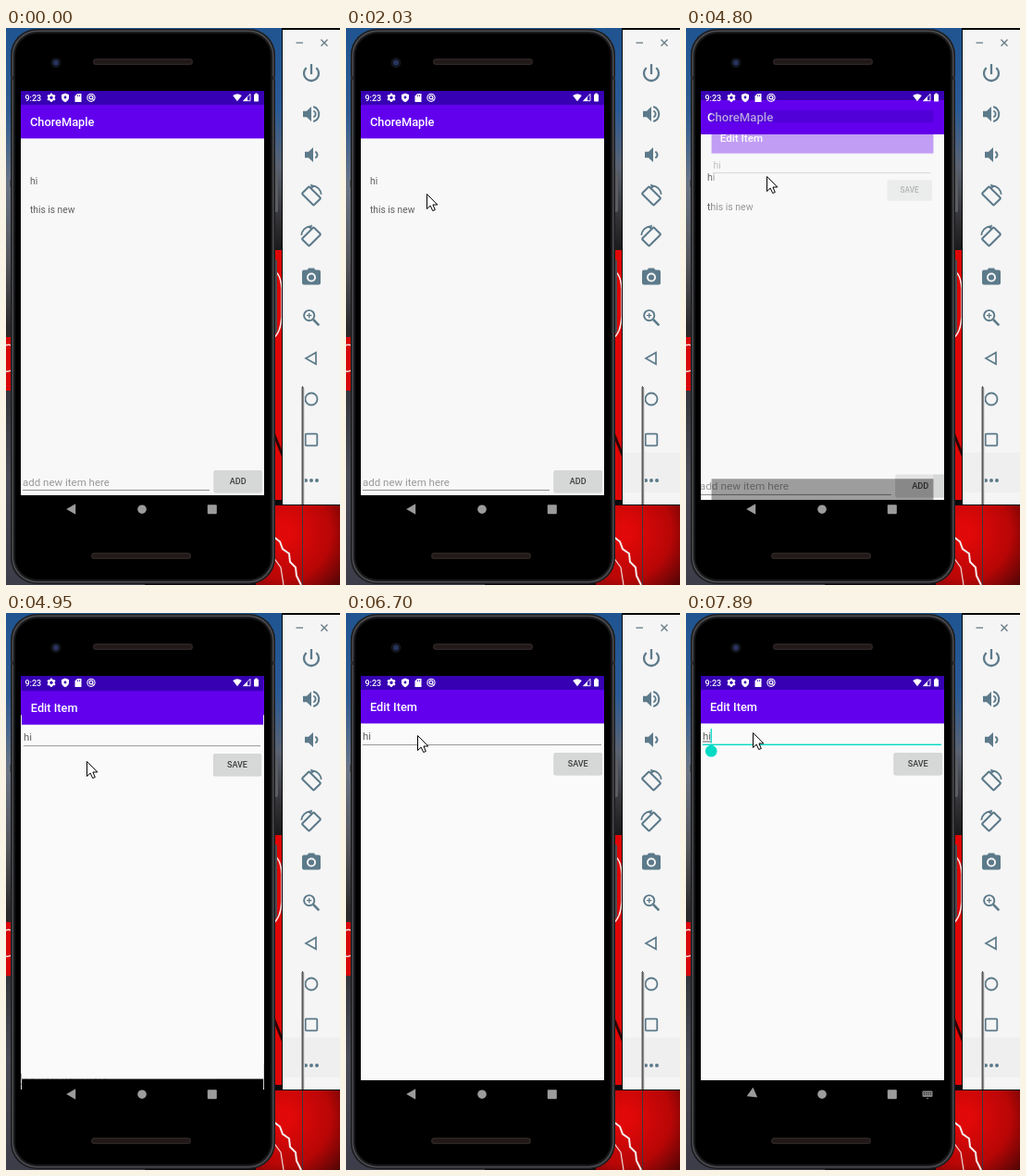
Write an HTML page with a canvas that moves like this. It is 361 px wide and 602 px high and loops after 8 s.

```html
<!DOCTYPE html>
<html lang="en">
<head>
<meta charset="utf-8">
<title>ChoreMaple</title>
<style>
  html, body { margin: 0; width: 100%; height: 100%; overflow: hidden; background: #000; }
  canvas { display: block; width: 361px; height: 602px; }
</style>
</head>
<body>
<canvas id="stage" width="361" height="602"></canvas>
<script>
const W = 361, H = 602, LOOP = 8000;
const stage = document.getElementById('stage').getContext('2d');
const layer = document.createElement('canvas');
layer.width = W;
layer.height = H;
const layerCtx = layer.getContext('2d');
let c = stage;

const PURPLE = '#6200ee', DEEP = '#3700b3', TEAL = '#03dac5', ICON = '#5c7a8a';

// pointer: [time, x, y]; no position means hidden
const POINTER = [
  [0], [500, 349, 483], [650, 22, 459], [1180], [1580, 100, 69], [1730, 102, 111],
  [1880, 92, 179], [2030, 87, 179], [3840, 87, 160], [5880, 87, 156], [6030, 84, 143],
  [6180, 83, 138], [6430, 81, 136], [6550, 79, 134], [6700, 77, 132],
  [7340, 76, 131], [7490, 73, 130], [7640, 72, 129]
];

function rect(x, y, w, h, fill) {
  c.fillStyle = fill;
  c.fillRect(x, y, w, h);
}

function round(x, y, w, h, r, fill) {
  c.fillStyle = fill;
  c.beginPath();
  c.roundRect(x, y, w, h, r);
  c.fill();
}

function disc(x, y, r, fill) {
  c.fillStyle = fill;
  c.beginPath();
  c.arc(x, y, r, 0, 7);
  c.fill();
}

function shape(d, fill) {
  c.fillStyle = fill;
  c.fill(new Path2D(d));
}

function line(d, color, width) {
  c.strokeStyle = color;
  c.lineWidth = width;
  c.stroke(new Path2D(d));
}

function arc(x, y, r, from, to, color, width) {
  c.strokeStyle = color;
  c.lineWidth = width;
  c.beginPath();
  c.arc(x, y, r, from, to);
  c.stroke();
}

function text(s, x, y, size, color, weight = 400, align = 'left') {
  c.font = `${weight} ${size}px Roboto, sans-serif`;
  c.textAlign = align;
  c.fillStyle = color;
  c.fillText(s, x, y);
}

function at(x, y, draw, turn = 0, sx = 1) {
  c.save();
  c.translate(x, y);
  c.rotate(turn);
  c.scale(sx, 1);
  draw();
  c.restore();
}

function fade(x, y, w, h, stops) {
  const g = c.createLinearGradient(0, y, 0, y + h);
  stops.forEach(([p, color]) => g.addColorStop(p, color));
  rect(x, y, w, h, g);
}

function wallpaper() {
  rect(0, 0, W, H, '#0b0b0f');
  fade(0, 0, 150, H, [[0, '#1f5490'], [.15, '#2f5c92'], [.28, '#6a7486'], [.42, '#55565c'],
    [.54, '#2a2829'], [.66, '#35353c'], [.8, '#4a4b58'], [1, '#3c3d49']]);
  rect(0, 334, 10, 58, '#d80808');
  line('M0 343Q4 341 8 345M0 371Q4 372 8 368', '#f3e6e6', 1.5);
  fade(150, 0, 149, 250, [[0, '#1f5490'], [.35, '#2a5a96'], [.6, '#5a6270'], [.85, '#2e2d30'], [1, '#141214']]);
  shape('M284 240H299V510H284Z', '#e00606');
  line('M288 262Q297 264 298 282V312Q297 330 288 336', '#f5eeee', 1.5);
  line('M286 430L299 462', '#2a0606', 3);

  const red = c.createRadialGradient(300, 545, 10, 300, 545, 85);
  red.addColorStop(0, '#e00808');
  red.addColorStop(.55, '#b80606');
  red.addColorStop(1, '#4a0505');
  rect(270, 516, 91, 86, red);
  line('M288 549L296 555L299 563L306 568L307 577L313 583L314 592L319 602', '#f4f0f0', 2);
  line('M289 572L297 583L300 602', '#f0dede', 1.2);
}

function phone() {
  round(288, 157, 6, 42, 2, '#5b5d62');
  round(288, 250, 5, 80, 2, '#4a4c51');
  rect(4, 164, 3, 8, '#4e5056');
  round(5, 1, 286, 600, 28, '#1d1d1f');
  round(6.5, 2.5, 283, 597, 27, '#4b4c50');
  round(8, 4, 280, 594, 26, '#19191b');
  round(10, 6, 276, 590, 24, '#000');
  rect(5, 52, 3, 4, '#2b2c2f');
  rect(288, 52, 3, 4, '#2b2c2f');
  disc(54, 37.5, 5.5, '#12141b');
  disc(54, 37.5, 3, '#26335c');
  [[94, 33], [92, 567]].forEach(([x, y]) => {
    round(x, y, 108, 7, 3.5, '#2d2424');
    round(x + 1.5, y + 1.5, 105, 4, 2, '#211818');
  });
}

function button(label, y) {
  round(224.5, y + .5, 52.5, 24, 2, '#cfcfcf');
  round(224.5, y, 52.5, 24, 2, '#d6d7d7');
  text(label, 250.7, y + 15.2, 9, '#3c3c3c', 500, 'center');
}

function windowBase(title, bg) {
  rect(16, 68, 263, 15, DEEP);
  rect(16, 119, 263, 386, bg);
  rect(16, 83, 263, 36.4, PURPLE);
  rect(16, 505, 263, 34, '#000');
  text(title, 26, 105.5, 12.8, '#fff', 500);
}

function listWindow() {
  windowBase('ChoreMaple', '#f8f8f8');
  text('hi', 26, 168.5, 10.24, '#5f5f5f');
  text('this is new', 26, 199.5, 10.24, '#5f5f5f');
  text('add new item here', 18, 494.5, 11.5, '#999');
  rect(18, 499, 202, 1, '#8c8c8c');
  button('ADD', 478);
}

function editWindow(t) {
  const focused = t >= 6820;
  const caret = t >= 7190 && !(t >= 7490 && t < 7640);
  windowBase('Edit Item', '#fafafa');
  text('hi', 18, 137, 11.5, '#606060');
  if (focused) rect(18, 141.6, 258, 1.4, TEAL);
  else rect(18, 142, 258, 1, '#999');
  button('SAVE', 151);
  if (t >= 7640) rect(18, 138.5, 9, 1, '#606060');
  if (caret) rect(26.6, 125, 1.3, 15.5, TEAL);
  if (t >= 7340) {
    disc(27.2, 149.3, 6.3, TEAL);
    shape('M27.2 141.8L32 146H22.4Z', TEAL);
  }
}

function scaled(k, draw) {
  c.save();
  c.translate(147.5, 303);
  c.scale(k, k);
  c.translate(-147.5, -303);
  draw();
  c.restore();
}

function screen(t) {
  c.save();
  c.beginPath();
  c.rect(16, 68, 263, 470);
  c.clip();
  if (t < 4800) listWindow();
  else if (t < 4950) {
    scaled(1.025, listWindow);
    c = layerCtx;
    c.clearRect(0, 0, W, H);
    scaled(.912, () => editWindow(t));
    c = stage;
    c.globalAlpha = .36;
    c.drawImage(layer, 0, 0);
  } else if (t < 5070) {
    scaled(1.05, listWindow);
    scaled(.993, () => editWindow(t));
  } else editWindow(t);
  c.restore();
}

function statusIcons() {
  const white = '#fff';
  text('9:23', 20.5, 78.7, 9, white, 500);
  at(49, 75.3, () => {
    arc(0, 0, 2.7, 0, 7, white, 2);
    for (let i = 0; i < 6; i++) at(0, 0, () => rect(-1, -4.7, 2, 2, white), i * Math.PI / 3);
  });
  shape('M64 70.5L68 72V75Q68 78.5 64 80.3Q60 78.5 60 75V72Z', white);
  disc(64, 75, 1.4, DEEP);
  shape('M77 71H81.5V80H74.5V73.5Z', white);
  rect(77, 72.3, .8, 1.8, DEEP);
  rect(79, 72.3, .8, 1.8, DEEP);
  arc(92, 75.3, 4.1, 0, 7, white, 1.1);
  arc(92, 75, 1.9, 0, 7, white, 1.2);
  line('M93 76L95 78.5', white, 1.2);
  shape('M250 79.3L245.2 73Q250 69.3 254.8 73Z', white);
  line('M264 71.3V78.7H256.6Z', white, .9);
  shape('M261 74.3V79H256.3Z', white);
  round(268, 71.5, 5, 8, .8, white);
  rect(269.4, 70.5, 2.2, 1.5, white);
}

function navIcons(t) {
  const grey = '#9b9b9b', typing = t >= 7890;
  at(70.7, 520, () => shape('M-5.5 0L4.5 -5.8V5.8Z', grey), typing ? -.42 : 0);
  disc(147, 520.2, 4.8, grey);
  round(217.8, 515.2, 10, 10, 1, grey);
  if (!typing) return;
  round(255.5, 516.5, 11, 6.5, 1, '#858585');
  for (let i = 0; i < 4; i++) {
    rect(257 + i * 2.3, 518, 1, 1, '#111');
    rect(257 + i * 2.3, 519.8, 1, 1, '#111');
  }
  shape('M259.5 524H262.5L261 525.6Z', '#858585');
}

function tilt() {
  at(0, .5, () => {
    c.strokeStyle = ICON;
    c.lineWidth = 2;
    c.beginPath();
    c.roundRect(-9, -5.5, 18, 11, 1);
    c.stroke();
  }, Math.PI / 4);
  arc(0, 0, 10.8, -1.45, -.1, ICON, 1.8);
  shape('M-1 -12.5L4 -10L0 -7Z', ICON);
}

function toolbar(t) {
  const bg = '#f5f5f5', x = 330;
  rect(298, 0, 63, 516, '#050505');
  rect(299, 2, 62, 513, bg);
  if (t >= 650) rect(299, 459, 62, 43, '#efefef');
  line('M313.5 16H321', '#687b85', 1.3);
  line('M340.5 12.5L347.5 19.5M347.5 12.5L340.5 19.5', '#687b85', 1.4);
  at(x, 49, () => {
    arc(0, 0, 8, -.85, Math.PI + .85, ICON, 2.3);
    line('M0 -10V1', ICON, 2.3);
  });
  at(x, 93, () => {
    shape('M-9 -3.2H-5L0 -8V8L-5 3.2H-9Z', ICON);
    arc(1, 0, 3.6, -1.2, 1.2, ICON, 2);
    arc(0, 0, 8.3, -1.3, 1.3, ICON, 2);
  });
  at(x, 137, () => {
    shape('M-7 -3.2H-3L2 -8V8L-3 3.2H-7Z', ICON);
    arc(3, 0, 3.5, -1.2, 1.2, ICON, 2);
  });
  at(x, 181, tilt);
  at(x, 225, tilt, 0, -1);
  at(x, 268.5, () => {
    round(-10, -7, 20, 16, 2, ICON);
    shape('M-5 -6L-3 -9H3L5 -6Z', ICON);
    disc(0, 1, 5, bg);
    disc(0, 1, 3.1, ICON);
  });
  at(x, 313, () => {
    arc(-2.3, -2.3, 5.6, 0, 7, ICON, 1.9);
    line('M2 2L8.3 8.3', ICON, 2.5);
    line('M-5 -2.3H.4M-2.3 -5V.4', ICON, 1.3);
  });
  at(x, 357, () => line('M-6 0L5 -6.3V6.3Z', ICON, 1.7));
  arc(x, 401, 6.5, 0, 7, ICON, 1.8);
  c.strokeStyle = ICON;
  c.beginPath();
  c.roundRect(323.7, 438.7, 12.6, 12.6, 1);
  c.stroke();
  for (let i = -1; i < 2; i++) disc(x + i * 6, 489, 2, ICON);

  // edge of a window lying behind the toolbar
  rect(319, 388, 1, 127, '#a8a8a8');
  rect(320, 387, 1, 128, '#5c5c5c');
  rect(321, 388, 1, 127, '#8f8f8f');
  rect(322, 389, 1, 126, '#dedede');
  rect(320, 516, 1, 86, '#3f3538');
}

function pointer(t) {
  const [, x, y] = POINTER.filter(p => p[0] <= t).pop();
  if (x === undefined) return;
  at(x + .5, y + .5, () => {
    const d = 'M0 0V16L3.7 12.6L6.2 18L8.8 17L6.4 11.5H11.3Z';
    shape(d, '#fff');
    line(d, '#000', 1);
  });
}

function render(t) {
  wallpaper();
  phone();
  screen(t);
  statusIcons();
  navIcons(t);
  toolbar(t);
  pointer(t);
}

const start = performance.now();
function tick() {
  render((performance.now() - start) % LOOP);
  requestAnimationFrame(tick);
}
tick();
</script>
</body>
</html>
```
